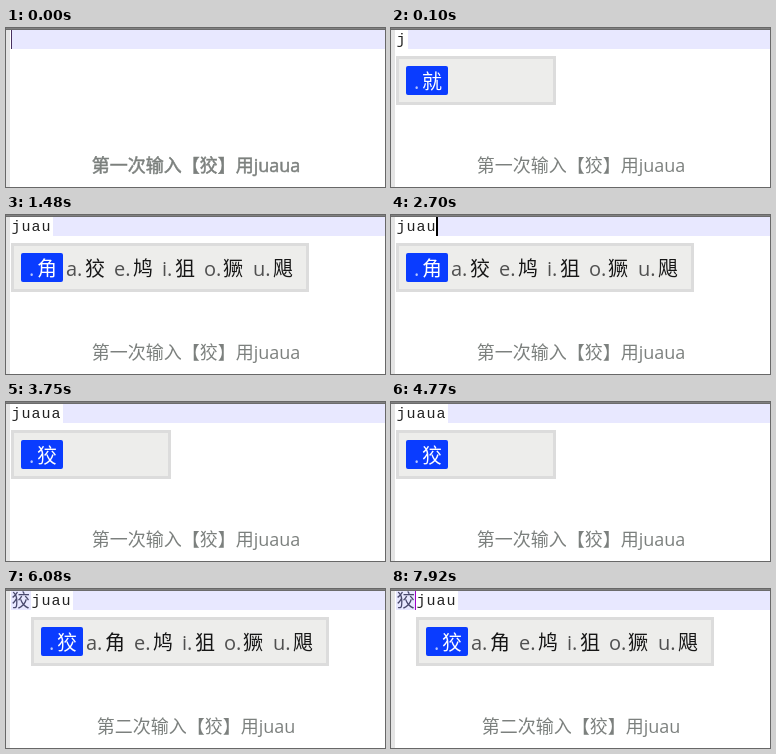
These frames come from a looping animation (379x159 px, 8000 ms). An HTML page with a canvas:

```html
<!DOCTYPE html>
<html lang="zh-CN">
<head>
<meta charset="utf-8">
<title>输入演示</title>
<style>
html, body { margin: 0; width: 100%; height: 100%; overflow: hidden; background: #fff; }
canvas { display: block; }
</style>
</head>
<body>
<canvas id="stage" width="379" height="159"></canvas>
<script>
const ctx = document.getElementById('stage').getContext('2d');
const LOOP = 8000, SECOND = 4830;
const SANS = '"Open Sans", "Noto Sans CJK SC", "Noto Sans CJK", sans-serif';
const MONO = '"Liberation Mono", monospace';

// [start, value]
const typed = [[0, ''], [100, 'j'], [430, 'ju'], [560, 'jua'], [1450, 'juau'], [2830, 'juaua'],
  [SECOND, 'j'], [5230, 'ju'], [5560, 'jua'], [6080, 'juau']];
const choices = [[0, ''], [100, '就'], [430, '几'], [560, '解'], [1480, '角狡鸠狙獗飓'], [2830, '狡'],
  [SECOND, '就'], [5230, '几'], [5560, '解'], [6080, '狡角鸠狙獗飓']];

// times at which each caret flips; both begin hidden
const endCaret = [560, 710, 1120, 1450, 1640, 2190, 2700, 2830, 3190, 3750, 4260, 4770,
  5850, 6080, 6360, 6900, 7400, 7920];
const startCaret = [4830, 5050, 5280, 5560, 5790, 6030, 6310, 6540, 6770, 7050, 7280, 7510, 7790];

const labels = ['.', 'a.', 'e.', 'i.', 'o.', 'u.'];
const labelX = [18, 55, 103, 151, 193, 242];
const glyphX = [26, 74, 122, 164, 212, 262];

const valueAt = (list, t) => list.filter(step => step[0] <= t).pop()[1];
const isOn = (flips, t) => flips.filter(f => f <= t).length % 2 === 1;

function rect(color, x, y, w, h) {
  ctx.fillStyle = color;
  ctx.fillRect(x, y, w, h);
}

function write(text, x, y, color, font) {
  ctx.fillStyle = color;
  ctx.font = font;
  ctx.fillText(text, x, y);
}

function drawChoices(x, glyphs) {
  const w = glyphs.length > 1 ? 298 : 160;
  rect('#dcdcdc', x, 28, w, 49);
  rect('#ededeb', x + 3, 31, w - 6, 43);
  ctx.fillStyle = '#0a3cff';
  ctx.beginPath();
  ctx.roundRect(x + 10, 38, 42, 29, 2);
  ctx.fill();
  [...glyphs].forEach((glyph, i) => {
    write(labels[i], x + labelX[i], 61, i ? '#505050' : '#b8c8ff', '20px ' + SANS);
    write(glyph, x + glyphX[i], 61, i ? '#161616' : '#fff', '20px ' + SANS);
  });
}

function drawCaption(t) {
  const text = t < SECOND ? '第一次输入【狡】用juaua' : '第二次输入【狡】用juau';
  ctx.textAlign = 'center';
  write(text, 190, 144, '#7c807e', '18px ' + SANS);
  // the opening caption is heavier
  if (t < 50) {
    ctx.strokeStyle = '#7c807e';
    ctx.lineWidth = 0.5;
    ctx.strokeText(text, 190, 144);
  }
  ctx.textAlign = 'left';
}

function draw(t) {
  const second = t >= SECOND, x = second ? 25 : 5;
  const text = valueAt(typed, t), glyphs = valueAt(choices, t);

  rect('#fff', 0, 0, 379, 159);
  rect('#e4e4e4', 0, 0, 4, 159);
  rect('#e8e8ff', 5, 2, 374, 19);
  rect('#808080', 0, 0, 379, 1);
  rect('#6c6c6c', 0, 1, 379, 1);

  if (second) write('狡', 5.5, 18, '#48486c', '300 18.5px ' + SANS);
  if (text) {
    const end = x + text.length * 10;
    rect('#fff', x, 2, end + 2 - x, 19);
    [...text].forEach((c, i) => write(c, x + 0.5 + i * 10, 16, '#222', '15px ' + MONO));
    if (isOn(endCaret, t)) rect('#000', end, 2, 2, 19);
  }
  if (t < 50) rect('#483060', 5, 2, 1, 19);
  if (isOn(startCaret, t)) rect('#a000c8', 24, 2, 1, 19);
  if (glyphs) drawChoices(x, glyphs);
  drawCaption(t);
}

const begin = performance.now();
function tick() {
  draw((performance.now() - begin) % LOOP);
  requestAnimationFrame(tick);
}
tick();
</script>
</body>
</html>
```
